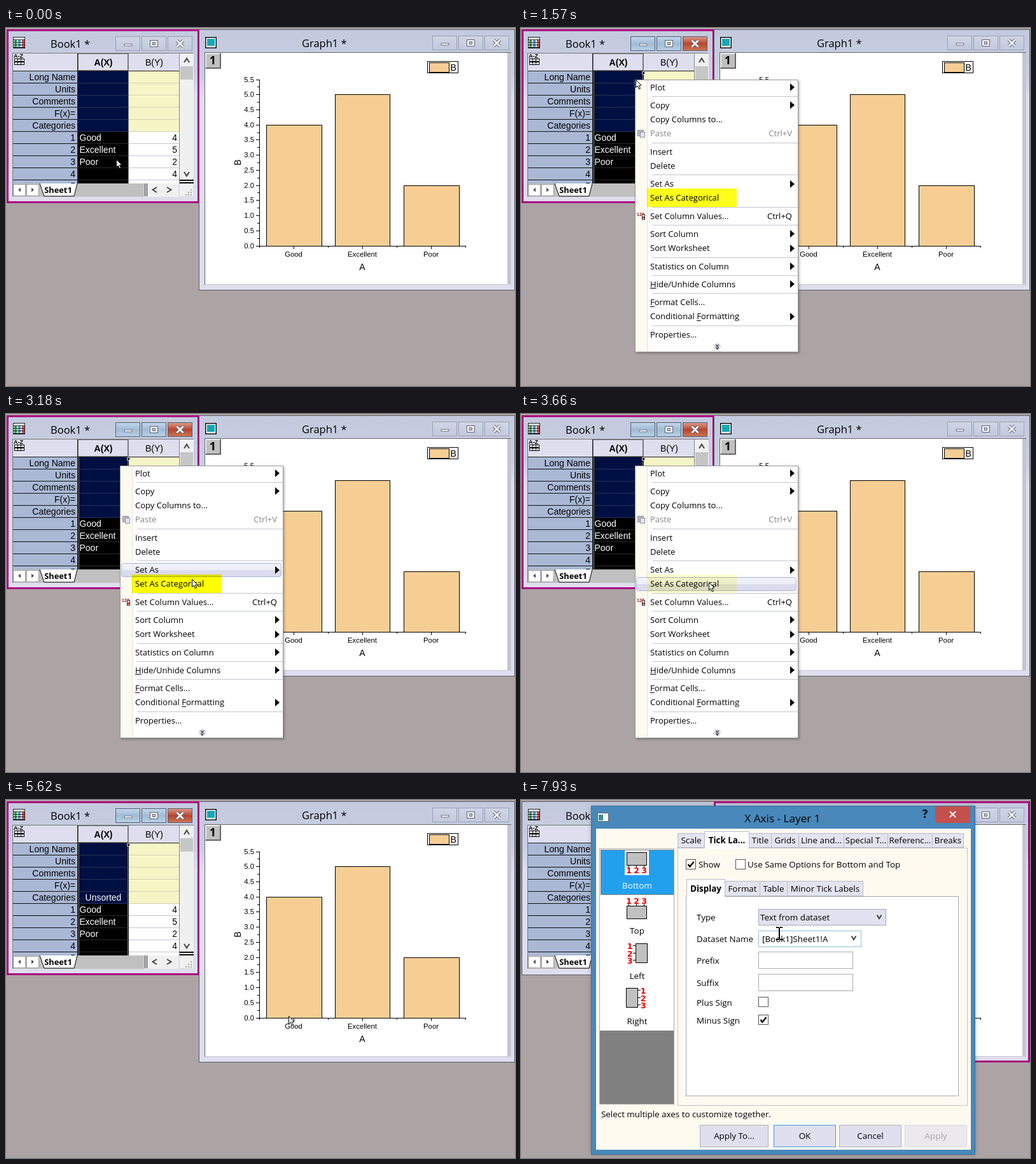
An HTML page with a canvas that plays this animation: 800x562 px, repeating every 8000 ms.

```html
<!DOCTYPE html>
<html lang="en">
<head>
<meta charset="utf-8">
<title>Set column as categorical</title>
<style>
html, body { margin: 0; height: 100%; overflow: hidden; background: #aca4a4; }
canvas { display: block; }
</style>
</head>
<body>
<canvas id="stage" width="800" height="562"></canvas>
<script>
const ctx = document.getElementById('stage').getContext('2d');
const LOOP = 8000, MENU_OPEN = 910, MENU_CLOSE = 3840, GRAPH_ACTIVE = 6320, APP_BLUR = 6670, DIALOG = 7230;
const UI = '"Open Sans", sans-serif', ARIAL = '"Liberation Sans", sans-serif';
const MAGENTA = '#ac0080', LILAC = '#dedeee', PEACH = '#f6ce94';

const clamp = v => Math.max(0, Math.min(1, v));
const smooth = k => k * k * (3 - 2 * k);

// Boxes take corner coordinates; strokes lie inside the corners.
function box(x0, y0, x1, y1, fill, stroke, width = 1) {
  if (fill) { ctx.fillStyle = fill; ctx.fillRect(x0, y0, x1 - x0, y1 - y0); }
  if (stroke) {
    ctx.strokeStyle = stroke; ctx.lineWidth = width;
    ctx.strokeRect(x0 + width / 2, y0 + width / 2, x1 - x0 - width, y1 - y0 - width);
  }
}
function path(points, { fill, stroke, width = 1, close = false }) {
  ctx.beginPath();
  for (let i = 0; i < points.length; i += 2) ctx.lineTo(points[i], points[i + 1]);
  if (close) ctx.closePath();
  if (fill) { ctx.fillStyle = fill; ctx.fill(); }
  if (stroke) { ctx.strokeStyle = stroke; ctx.lineWidth = width; ctx.stroke(); }
}
// y is the middle of the capitals; baselines sit on whole pixels
function text(str, x, y, { size = 13.4, font = UI, color = '#000', align = 'left', weight = 400 } = {}) {
  ctx.font = `${weight} ${size}px ${font}`;
  ctx.fillStyle = color;
  ctx.textAlign = align;
  ctx.fillText(str, x, Math.round(y + size * .36));
}
function fade(y0, y1, ...colors) {
  const g = ctx.createLinearGradient(0, y0, 0, y1);
  colors.forEach((c, i) => g.addColorStop(i / (colors.length - 1), c));
  return g;
}
function chevron(x, y, dx, dy, color = '#444', width = 2) {
  path([x - dx - dy, y - dy - dx, x + dx * .6, y + dy * .6, x - dx + dy, y - dy + dx], { stroke: color, width });
}

function windowButtons(x, y, hot) {
  for (let i = 0; i < 3; i++) {
    const l = x + i * 41, cx = l + 19.5, cy = y + 11.5, ink = '#5c6274';
    const fill = !hot ? fade(y, y + 23, '#d0d5e6', '#c3c9dd')
      : i < 2 ? fade(y, y + 23, '#c6d9ec', '#9fbbd6', '#b9d3e8') : fade(y, y + 23, '#dda18f', '#b8452c', '#cf7a55');
    box(l, y, l + 39, y + 23, fill, hot ? '#535e72' : '#9aa1b5');
    if (i === 0) box(cx - 6, cy, cx + 7, cy + 4, '#fff', ink);
    if (i === 1) { box(cx - 6.5, cy - 5.5, cx + 6.5, cy + 5.5, '#fff', ink); box(cx - 2.5, cy - 2.5, cx + 2.5, cy + 2.5, '#c6cce0', ink); }
    if (i === 2) for (const [color, width] of [[ink, 4.6], ['#fff', 2.6]]) {
      path([cx - 5, cy - 5, cx + 5, cy + 5], { stroke: color, width });
      path([cx + 5, cy - 5, cx - 5, cy + 5], { stroke: color, width });
    }
  }
}
function frame(x0, y0, x1, y1, title, titleX, titleY, active) {
  box(x0, y0, x1, y1, fade(y0, y0 + 108, '#c4cade', '#c6cce0', '#c9cee2', '#dedeee'), '#5d5d66');
  if (active) box(x0, y0, x1, y1, null, MAGENTA, 3);
  text(title, titleX, titleY, { size: 16.5 });
}

function drawBook(t) {
  const active = t < GRAPH_ACTIVE, opened = t >= MENU_OPEN;
  frame(1, 2, 304, 275, 'Book1 *', 70, 25, active);
  windowButtons(172, 13, active && opened);
  box(11, 14, 30, 32, '#fff', '#222');
  ['#37a853', '#4fa3e0', '#e05050'].forEach((c, i) => box(13 + i * 6, 19, 17 + i * 6, 30, c));
  for (let y = 18; y < 31; y += 4) box(12, y, 29, y + 1, '#222');

  ctx.save();
  ctx.beginPath(); ctx.rect(10, 39, 285, 205); ctx.clip();
  box(10, 39, 295, 265, '#fff');
  box(10, 39, 273, 68, LILAC);
  text('A-Z', 12, 44, { size: 9, font: ARIAL, weight: 700 });
  box(13, 48, 29, 58, '#fff', '#000');
  for (const x of [18, 23]) box(x, 48, x + 1, 58, '#000');
  box(13, 52, 29, 54, '#000');
  const labels = ['Long Name', 'Units', 'Comments', 'F(x)=', 'Categories', 1, 2, 3, 4, 5];
  const names = ['Good', 'Excellent', 'Poor'], values = [4, 5, 2, 4];
  const cell = { size: 14, font: ARIAL };
  labels.forEach((label, i) => {
    const y = 68 + 19 * i, mid = y + 8.5, meta = i < 5;
    box(10, y, 112, y + 19, '#a9b8d5');
    box(113, y, 193, y + 19, meta ? '#000f42' : '#000');
    box(193, y, 272, y + 19, meta ? '#f6f5c5' : '#fff');
    box(10, y + 18, 112, y + 19, '#111');
    box(113, y + 18, 193, y + 19, meta ? '#26345c' : '#2b2b2b');
    box(193, y + 18, 272, y + 19, meta ? '#d3d2b4' : '#c4c4d2');
    text(label, 109, mid, { ...cell, align: 'right' });
    if (!meta) {
      text(names[i - 5] || '', 115.5, mid, { ...cell, color: '#fff' });
      text(values[i - 5] || '', 269, mid, { ...cell, align: 'right' });
    }
  });
  if (t >= MENU_CLOSE) text('Unsorted', 153, 153, { ...cell, color: '#fff', align: 'center' });
  box(10, 67, 272, 68, '#222');
  for (const x of [112, 192, 272]) box(x, 39, x + 1, 244, x === 112 ? '#222' : '#888');
  text('A(X)', 153, 54, { ...cell, weight: 700, align: 'center' });
  text('B(Y)', 233, 54, { ...cell, align: 'center' });
  ctx.setLineDash([1, 1]);
  box(113, 40, 192, 67, null, '#000');
  ctx.setLineDash([]);
  if (opened) {
    box(113, 68, 116, 244, '#111'); box(114, 68, 115, 244, '#777');
    box(190, 68, 193, 244, '#111'); box(191, 68, 192, 244, '#777');
    box(190, 68, 195, 73, '#111', '#ccc');
  }
  box(273, 39, 295, 244, '#f0f0f0');
  box(274, 60, 294, 81, '#c6c6c6');
  chevron(284, 50, 0, -4); chevron(284, 230, 0, 4);
  box(273, 238, 295, 240, '#111'); box(273, 242, 295, 244, '#111');
  ctx.restore();
  box(10, 39, 295, 40, '#777'); box(10, 39, 11, 265, '#777');

  box(11, 244, 218, 265, '#c0c0c0');
  for (const [x, s] of [[11, -1], [32, 1]]) {
    box(x, 245, x + 20, 264, '#fff', '#999');
    path([x + 10 + 2 * s, 254, x + 10 - 2 * s, 250.5, x + 10 - 2 * s, 257.5], { fill: '#555' });
  }
  path([53, 244, 60, 264, 107, 264, 112, 244], { fill: '#fff', stroke: '#000' });
  text('Sheet1', 82, 254, { size: 12.8, weight: 700, align: 'center' });
  box(217, 244, 224, 265, LILAC); box(218, 244, 219, 264, '#333'); box(221, 244, 222, 264, '#333');
  box(223, 244, 271, 265, '#f0f0f0');
  chevron(233, 254, -4, 0); chevron(257, 254, 4, 0);
  box(272, 244, 295, 265, '#f0f0f0', '#ddd');
  for (let i = 0; i < 3; i++) for (let j = 0; j <= i; j++) box(290 - j * 4, 253 + i * 4, 292 - j * 4, 255 + i * 4, '#aaa');
}

function drawGraph(t) {
  const active = t >= GRAPH_ACTIVE, small = { size: 11.3, font: ARIAL }, large = { size: 14, font: ARIAL };
  frame(303, 2, 800, 412, 'Graph1 *', 465, 24, active);
  windowButtons(670, 12, active && t < APP_BLUR);
  box(313, 14, 331, 32, '#fff', '#111', 1.5);
  box(316, 17, 328, 28, '#14a9b5');
  box(312, 38, 794, 403, '#fff', '#c9c9d4');
  box(312, 38, 794, 39, '#666'); box(312, 38, 313, 403, '#666');
  box(788, 39, 793, 402, '#c4c4ce');
  box(313, 39, 338, 64, '#c0c0c0');
  if (!active) {
    path([337, 40, 337, 63, 314, 63], { stroke: '#666', width: 2 });
    path([336, 40, 314, 40, 314, 62], { stroke: '#eee', width: 2 });
  }
  text('1', 325, 51, { size: 18, weight: 700, align: 'center' });

  const level = v => Math.floor(342 - 47.45 * v);
  [['Good', 4, 409, 497], ['Excellent', 5, 517, 604], ['Poor', 2, 625, 713]].forEach(([name, v, left, right], i) => {
    const x = 452 + 108 * i;
    box(left, level(v), right, 343, PEACH, '#000');
    box(x, 342, x + 1, 347, '#000');
    text(name, x, 355, { ...small, align: 'center' });
  });
  box(398, 81, 399, 343, '#000'); box(398, 342, 723, 343, '#000');
  for (let i = 0; i < 4; i++) box(398 + i * 108, 342, 399 + i * 108, 345, '#000');
  for (let i = 0; i <= 22; i++) {
    const y = level(i / 4), major = i % 2 === 0;
    box(major ? 393 : 395, y, 399, y + 1, '#000');
    if (major) text((i / 4).toFixed(1), 390, y, { ...small, align: 'right' });
  }
  text('A', 560, 375, { ...large, align: 'center' });
  ctx.save();
  ctx.translate(364, 211); ctx.rotate(-Math.PI / 2);
  text('B', 0, 0, { ...large, align: 'center' });
  ctx.restore();
  box(662, 52, 711, 71, '#fff', '#000');
  box(665, 54, 697, 70, PEACH, '#000');
  text('B', 698.5, 61.5, large);
}

// label, right-hand mark ('>' opens a submenu), underlined letter; null is a separator
const menu = [
  ['Plot', '>'], null, ['Copy', '>'], ['Copy Columns to...'], ['Paste', 'Ctrl+V'], null,
  ['Insert'], ['Delete'], null, ['Set As', '>'], ['Set As Categorical'], null,
  ['Set Column Values...', 'Ctrl+Q'], null, ['Sort Column', '>'], ['Sort Worksheet', '>'], null,
  ['Statistics on Column', '>'], null, ['Hide/Unhide Columns', '>', 0], null,
  ['Format Cells...', '', 0], ['Conditional Formatting', '>', 12], null, ['Properties...'],
];
function drawMenu(t, pointerY) {
  ctx.save();
  ctx.shadowColor = 'rgba(0,0,0,.25)'; ctx.shadowBlur = 3; ctx.shadowOffsetX = ctx.shadowOffsetY = 2;
  box(179, 81, 436, 509, '#fff');
  ctx.restore();
  box(179, 81, 436, 509, '#fff', '#979797');
  box(180, 82, 198, 508, '#fdfaf0'); box(198, 82, 199, 508, '#e4e2dc');
  let y = 93;
  for (const item of menu) {
    if (!item) { box(206, Math.round(y - 8), 435, Math.round(y - 7), '#c3c6d2'); y += 6.3; continue; }
    const [label, mark = '', underline] = item, color = label === 'Paste' ? '#858585' : '#000';
    const row = Math.round(y);
    if (t >= 1720 && color === '#000' && Math.abs(y - pointerY + 4) < 11) {
      ctx.beginPath(); ctx.roundRect(181.5, row - 10.5, 251, 21, 3);
      const g = fade(row - 11, row + 11, '#f1f1fa', '#dadaed');
      g.addColorStop(.48, '#eeeef9'); g.addColorStop(.52, '#dcdcee');
      ctx.fillStyle = g; ctx.fill();
      ctx.strokeStyle = '#a9b5da'; ctx.lineWidth = 1; ctx.stroke();
    }
    text(label, 203, y, { size: 13.05, color });
    if (underline !== undefined) {
      const x = 203 + ctx.measureText(label.slice(0, underline)).width;
      box(x, row + 6, x + ctx.measureText(label[underline]).width, row + 7, '#000');
    }
    if (mark === '>') path([423, row - 6, 430, row, 423, row + 6], { fill: '#000' });
    else text(mark, 426, y, { size: 13.05, color, align: 'right' });
    y += 22.1;
  }
  box(183, 160, 193, 170, '#b9b9c4', '#92929e'); box(187, 163, 195, 172, '#e4e4ee', '#92929e');
  text('123', 182, 292, { size: 7, font: ARIAL, weight: 700, color: '#b01818' });
  box(190, 292, 195, 301, '#fff', '#333'); box(191, 296, 194, 299, '#d33');
  ctx.beginPath(); ctx.arc(308.5, 500, 5.5, 0, 7); ctx.fillStyle = '#d8d8e4'; ctx.fill();
  chevron(308.5, 499, 0, 2, '#222', 1.2); chevron(308.5, 503, 0, 2, '#222', 1.2);

  const glow = clamp((t - 910) / 740) * (1 - clamp((t - 3360) / 380));
  ctx.save();
  ctx.globalCompositeOperation = 'multiply';
  ctx.globalAlpha = glow;
  box(198, 252, 339, 281, '#ff0');
  ctx.restore();
}

function tabs(edges, labels, chosen, y0, y1) {
  labels.forEach((label, i) => {
    const on = i === chosen, l = edges[i], r = edges[i + 1];
    box(l, on ? y0 - 3 : y0, r + 1, on ? y1 + 1 : y1, on ? '#fff' : '#e3e3f1', '#b9bccb');
    if (on) box(l + 1, y1 - 1, r, y1 + 2, '#fff');
    text(label, (l + r) / 2 + .5, (y0 + y1) / 2, { align: 'center', weight: on ? 700 : 400 });
  });
}
function checkbox(x, y, checked) {
  box(x, y, x + 16, y + 16, '#fff', '#555');
  if (checked) path([x + 3.5, y + 8, x + 6.5, y + 11.5, x + 12.5, y + 4], { stroke: '#000', width: 2.4 });
}
function axisIcon(x0, y0, x1, y1, numberX, numberY, across, tickFrom) {
  for (let i = 0; i < 3; i++) {
    const at = Math.round((across ? x0 : y0) + 3 + i * (across ? 12 : 11.5));
    if (across) box(at, tickFrom, at + 1, tickFrom + 5, '#000');
    else box(tickFrom, at, tickFrom + 5, at + 1, '#000');
    text(i + 1, across ? at + .5 : numberX, across ? numberY : at + 1,
      { size: 12.5, weight: 700, font: '"DejaVu Sans", sans-serif', color: '#f00000', align: 'center' });
  }
  box(x0, y0, x1, y1, '#c0c0c0', '#000');
}
function drawDialog() {
  ctx.save();
  ctx.shadowColor = 'rgba(0,0,0,.25)'; ctx.shadowBlur = 6;
  box(110, 9, 714, 557, '#4888bb');
  ctx.restore();
  box(110, 9, 714, 557, '#4888bb', '#3b719c');
  box(120, 20, 138, 34, '#fff', '#666'); box(122, 23, 129, 32, '#3d8f87');
  text('X Axis - Layer 1', 411, 29, { size: 17.2, align: 'center' });
  text('?', 635, 22, { size: 17, weight: 700, align: 'center' });
  box(651, 10, 706, 36, '#c4504c');
  path([674, 18, 683, 27], { stroke: '#fff', width: 2 }); path([683, 18, 674, 27], { stroke: '#fff', width: 2 });
  box(118, 45, 707, 549, '#fffaf0');

  box(123, 76, 241, 478, '#fff', '#aaa');
  box(124, 362, 240, 477, '#808080');
  box(125, 78, 240, 149, '#22a0ee');
  ctx.setLineDash([1, 1]);
  box(125, 78, 240, 149, null, '#dd5f11');
  ctx.setLineDash([]);
  box(163, 79, 201, 118, '#fff');
  axisIcon(166, 82, 198, 103, 0, 110, true, 102);
  axisIcon(166, 166, 198, 187, 0, 158, true, 162);
  axisIcon(180, 225, 199, 256, 171, 0, false, 176);
  axisIcon(165, 295, 184, 326, 192, 0, false, 183);
  ['Bottom', 'Top', 'Left', 'Right'].forEach((s, i) =>
    text(s, 182.5, 134 + i * 71, { align: 'center', color: i ? '#000' : '#fff' }));

  box(246, 75, 702, 480, '#fffaf0', '#c3c3cb');
  tabs([246, 288, 358, 393, 436, 507, 576, 646, 695],
    ['Scale', 'Tick La...', 'Title', 'Grids', 'Line and...', 'Special T...', 'Referenc...', 'Breaks'], 1, 52, 75);
  checkbox(259, 93, true); text('Show', 279, 101.5);
  checkbox(337, 93, false); text('Use Same Options for Bottom and Top', 356, 101.5);
  box(259, 151, 688, 465, '#fff', '#a9a9b2');
  tabs([260, 320, 375, 418, 537], ['Display', 'Format', 'Table', 'Minor Tick Labels'], 0, 127, 151);
  [['Type', 184], ['Dataset Name', 218], ['Prefix', 252], ['Suffix', 287], ['Plus Sign', 318.5], ['Minus Sign', 346]]
    .forEach(([s, y]) => text(s, 276, y));
  box(373, 171, 574, 197, '#e1e1ef', '#a7a9b7');
  text('Text from dataset', 376, 184); chevron(563, 184, 0, 3.5);
  box(373, 205, 535, 231, '#fff', '#8fc0df');
  text('[Book1]Sheet1!A', 379, 218); chevron(523, 217, 0, 3.5);
  box(373, 238, 522, 265, '#fff', '#ababb3');
  box(373, 273, 522, 300, '#fff', '#ababb3');
  checkbox(373, 309, false); checkbox(373, 337, true);

  text('Select multiple axes to customize together.', 126, 493);
  [['Apply To...', 281, 389], ['OK', 397, 495], ['Cancel', 500, 598], ['Apply', 603, 701]].forEach(([s, l, r], i) => {
    box(l, 510, r, 545, i === 3 ? '#ebe9ee' : '#dfdfee', ['#adb0bf', '#3aa0e8', '#adb0bf', '#dcdbe2'][i]);
    text(s, (l + r) / 2, 527.5, { align: 'center', color: i === 3 ? '#a3a3a8' : '#000' });
  });
}

// Pointer moves: start, end, from x, y, to x, y, sideways bulge
const moves = [
  [260, 650, 173, 206, 180, 81, 38],
  [1720, 3345, 180, 81, 295, 264, 0],
  [3690, 3870, 295, 264, 288, 255, 0],
  [4700, 5500, 288, 255, 431, 329, 0],
  [5500, 5620, 431, 329, 444, 339, 0],
  [5620, 6020, 444, 339, 449, 353, 0],
];
function pointerAt(t) {
  const [start, end, x0, y0, x1, y1, bulge] = moves.findLast(m => t >= m[0]) || moves[0];
  const k = smooth(clamp((t - start) / (end - start)));
  return [x0 + (x1 - x0) * k + bulge * 4 * k * (1 - k), y0 + (y1 - y0) * k];
}
function drawArrow(x, y) {
  ctx.save();
  ctx.translate(Math.round(x) + .5, Math.round(y) + .5);
  path([0, 0, 0, 12, 2.7, 9.6, 5, 14.5, 7, 13.5, 4.8, 8.8, 8.5, 8.5], { fill: '#fff', stroke: '#000', close: true });
  ctx.restore();
}
function drawBeam(x, y) {
  box(x - 1, y - 9, x + 1, y + 10, '#000');
  for (const dy of [-10, 9]) { box(x - 5, y + dy, x - 1, y + dy + 2, '#000'); box(x + 1, y + dy, x + 5, y + dy + 2, '#000'); }
}

function draw(now) {
  const t = now % LOOP, [x, y] = pointerAt(t);
  box(0, 0, 800, 562, '#aca4a4');
  drawBook(t);
  drawGraph(t);
  if (t >= MENU_OPEN && t < MENU_CLOSE) drawMenu(t, y);
  if (t >= DIALOG) {
    drawDialog();
    if (t < 7930) drawBeam(409, 218); else drawBeam(406, 209);
  } else drawArrow(x, y);
  requestAnimationFrame(draw);
}
requestAnimationFrame(draw);
</script>
</body>
</html>
```
